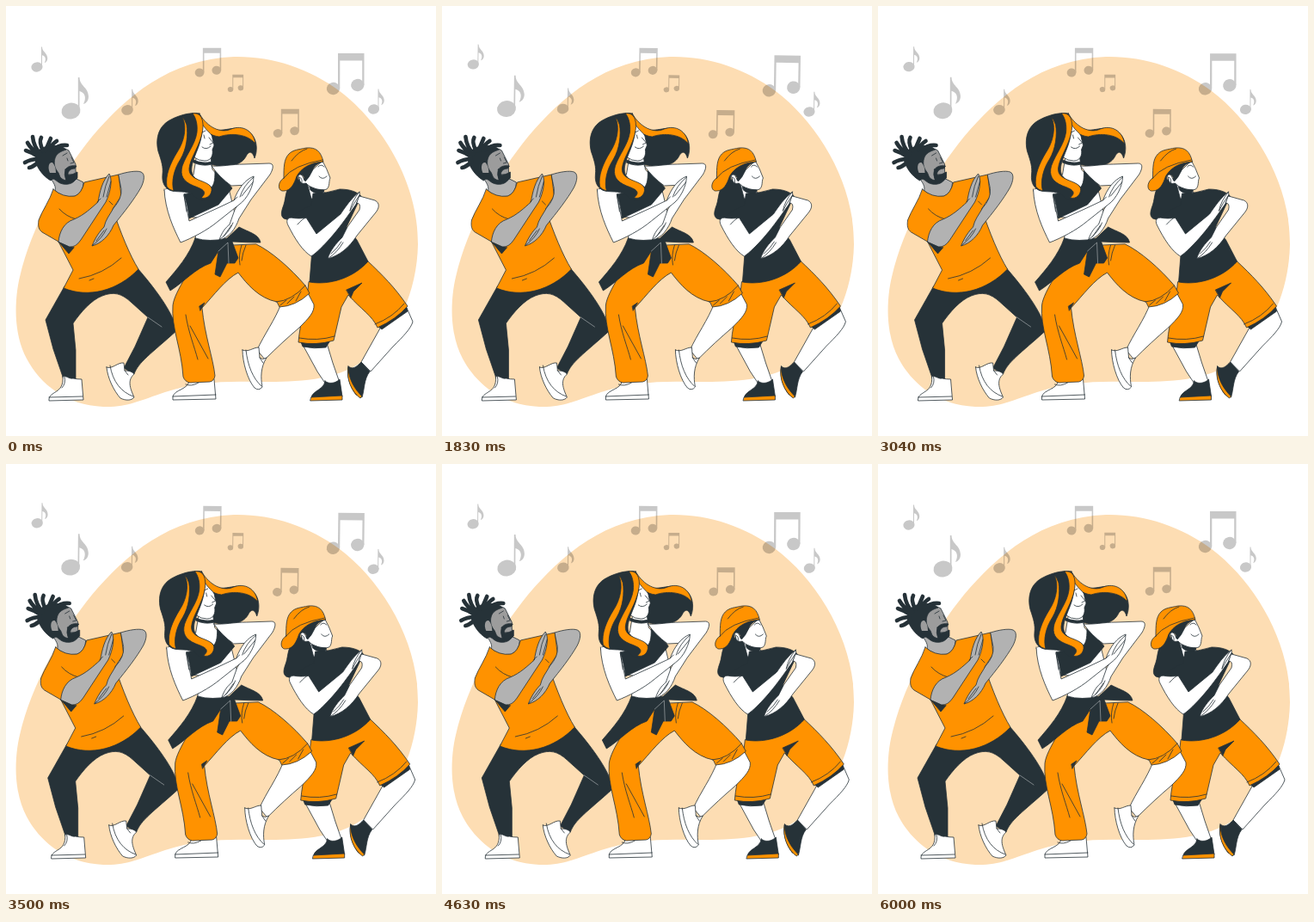
Recreate the animation shown at these times as an HTML page. Size 500 by 500 pixels, loop 6040 ms.

```html
<!DOCTYPE html>
<html lang="en">
<head>
<meta charset="utf-8">
<title>Dancers</title>
<style>
  html, body { margin: 0; width: 100%; height: 100%; overflow: hidden; background: #fff; }
  svg { display: block; width: 100vw; height: 100vh; }
  #dancers path { stroke: #263238; stroke-width: .8; stroke-linejoin: round; stroke-linecap: round; }
  .o { fill: #ff9200; }
  .d { fill: #263238; }
  .w { fill: #fff; }
  .s { fill: #b2b2b2; }
  .f { fill: #9c9c9c; }
  .l { fill: none; }
  #dancers .n { stroke: none; }
  #dancers .locks { fill: none; stroke-width: 4.6; }
  #dancers .crease { fill: none; stroke: #fff; stroke-width: .4; }
  #notes use { opacity: .21; }
</style>
</head>
<body>
<svg viewBox="0 0 500 500">
  <defs>
    <g id="single">
      <ellipse rx="11" ry="9.4" transform="rotate(-10)"/>
      <path d="M8.3-39H10C10-29 20-28 20.5-17C20.5-12 18-9 14.5-8C18-15 17-21 10-23V1H8.3Z"/>
    </g>
    <g id="pair">
      <ellipse rx="7.7" ry="7.2" transform="rotate(-12)"/>
      <ellipse cx="28.3" cy="-4" rx="7.7" ry="7.2" transform="rotate(-12 28.3 -4)"/>
      <path d="M5.5-41H36V-4H33.7V-32.5H7.8V0H5.5Z"/>
    </g>
  </defs>

  <path fill="#fdddb3" d="M265 59C308 58 352 72 388 99C437 136 480 206 479 277C478 332 455 385 415 413C380 438 330 437 290 437C250 436 220 438 185 449C155 459 140 467 113 466C70 464 40 440 24 410C8 380 10 340 16 315C30 255 65 195 100 152C140 105 190 62 265 59Z"/>

  <g id="notes">
    <use href="#single" transform="translate(36 71) scale(.6)"/>
    <use href="#single" transform="translate(75.5 122)"/>
    <use href="#single" transform="translate(141 121) scale(.62)"/>
    <use href="#single" transform="translate(427.5 120) scale(.6)"/>
    <use href="#pair" transform="translate(380.5 96)"/>
    <use href="#pair" transform="translate(225 77.5) scale(.7)"/>
    <use href="#pair" transform="translate(316 148) scale(.69)"/>
    <use href="#pair" transform="translate(261 97) scale(.42)"/>
  </g>

  <g id="dancers">
    <g id="capGirl">
      <path class="w" d="M344 392L362 425L372 440L388 438L380 415L373 392Z"/>
      <path class="w" d="M436 373L413 414L424 425L450 396C462 384 471 375 473 367L466 351Z"/>
      <path class="d" d="M371 436C375 440 383 439 388 434L391 454L355 455C357 447 370 446 371 436Z"/>
      <path class="o" d="M355 455L391 453V458L354 459Z"/>
      <path class="d" d="M398 419C404 424 409 418 413 414L423 425C416 434 417 446 414 455L407 452C400 443 396 430 398 419Z"/>
      <path class="o" d="M398 420C398 434 406 446 414 454L412 456C402 449 395 433 398 420Z"/>
      <path class="d" d="M342 388L345 396Q358 399 372 397L377 389ZM432 372L437 376L467 355L465 348Z"/>
      <path class="o" d="M352 321C350 346 342 365 340 391Q360 395 381 389L390 350L398 336C413 353 426 360 432 374Q454 364 467 349C452 327 438 313 420 296Z"/>
      <path class="l" d="M341 386Q362 390 382 384M429 370Q450 362 463 346"/>
      <path class="d" d="M396 330L414 322L404 332L401 339Z"/>
      <path class="d" d="M336 203C324 211 326 222 323 231C320 239 319 244 323 247C333 251 347 249 356 242L364 224L350 200Z"/>
      <path class="w" d="M350 205L355 224Q362 227 371 219L367 210Z"/>
      <path class="d" d="M331 246C340 239 345 236 355 232L357 218Q373 218 388 213C400 213 408 216 413 221L396 257L408 272L421 297C404 316 377 325 353 321L356 283Z"/>
      <path class="w" d="M341 201C337 192 344 193 347 203Q353 199 354 193L368 180L373 190L377 200C375 204 377 209 373 213C365 216 353 211 349 206Q342 208 341 201Z"/>
      <path class="d" d="M353 210Q361 214 370 214L368 218Q359 219 354 214Z"/>
      <path class="d" d="M335 201C341 189 354 182 369 181C362 183 358 186 356 192Q353 199 348 204C347 196 342 194 339 198L340 207Z"/>
      <path class="o" d="M323 200C323 188 323 178 329 172C334 167 340 167 349 165C361 164 366 169 369 181C353 182 343 189 338 198C335 207 331 215 323 215C316 216 315 205 323 200Z"/>
      <path class="l" d="M323 200Q334 185 368 179M332 180Q340 169 350 166M363 187Q366 183 370 187M364 198Q368 203 373 198M341 199Q345 200 344 205"/>
      <path class="w" d="M331 246C326 247 326 251 328 255C336 271 345 285 355 291C361 287 370 278 377 270C386 260 396 246 401 239C405 233 413 224 411 216C402 223 395 233 389 242L361 265L349 246Q341 248 331 246Z"/>
      <path class="w" d="M411 221L429 226C435 229 434 235 430 240L408 267C399 281 388 290 374 294C377 284 384 276 391 269L397 257L411 237Q413 229 408 229Z"/>
      <path class="l" d="M411 216Q402 227 400 238M411 220Q404 230 400 238M374 294Q385 287 392 275M378 288Q386 281 390 274M339 254Q345 247 349 246"/>
    </g>

    <g id="man">
      <path class="d" d="M68 326L46 365L55 399L67 434H81L81 400L78 369C87 356 99 342 112 337C125 332 134 334 145 344L165 362L150 396L137 421L149 428C154 414 168 405 199 377C193 354 172 327 153 305Z"/>
      <path class="crease" d="M165 362L181 373"/>
      <path class="w" d="M66 431C70 429 73 434 78 433Q83 434 88 434L90 458L50 459C49 447 68 452 66 431Z"/>
      <path class="l" d="M50 455L89 454M68 431Q70 439 65 444"/>
      <path class="w" d="M117 420C123 423 130 414 137 415L138 424Q146 424 149 428C141 435 144 444 149 455C146 459 139 459 133 456C125 447 118 432 117 420Z"/>
      <path class="l" d="M121 418C124 437 134 449 148 454M138 424L142 429"/>
      <path class="s" d="M53 202C57 208 58 211 57 215Q69 225 81 221Q90 216 90 205L80 200L62 194Z"/>
      <path class="o" d="M55 213C51 226 42 238 38 249C37 256 38 260 42 263L61 274L78 307L67 328C96 340 130 331 154 306C144 290 133 263 124 236L134 221L131 196L91 205Q88 218 80 221Q66 223 55 213Z"/>
      <path class="d" d="M61 274L73 288L79 281Z"/>
      <path class="l" d="M62 236Q70 245 82 248M85 317Q113 312 134 293M97 319L102 317M124 231L120 227"/>
      <path class="s" d="M131 196C140 193 152 191 157 193C162 195 161 203 157 211C149 225 138 239 125 255C120 267 111 276 100 279C104 269 109 262 114 257C116 248 120 244 125 235Q135 224 134 213Z"/>
      <path class="s" d="M61 274C62 263 67 252 79 248C91 243 99 235 107 228C109 216 112 203 120 195C124 201 122 216 116 228L108 240L87 272Q81 281 74 280Z"/>
      <path class="l" d="M120 198Q115 209 113 222M122 204L117 222M101 278Q112 270 117 259M105 273L114 261M106 228L110 224"/>
      <path class="f" d="M48 174C56 167 67 163 73 168L78 178L81 184L81 191L82 201C74 207 66 207 61 202L54 194Z"/>
      <path class="d" d="M36 170C42 162 55 161 66 164L70 167C64 169 59 171 57 177C55 184 57 189 61 194L63 199C68 205 76 203 82 199C80 207 70 209 63 206C57 203 56 199 52 203C43 198 36 188 34 180Z"/>
      <path class="locks" d="M40 172Q32 163 31 152M43 168Q38 158 41 153M46 168Q49 161 52 154M50 167Q54 160 59 157M54 167Q62 161 71 162M37 172Q29 166 25 159M37 175Q30 170 23 168M37 178Q29 178 22 182M38 181Q32 187 27 188"/>
      <path class="f n" d="M51 194C48 187 50 181 54 182Q58 186 58 194Z"/>
      <path class="d" d="M69 190C72 186 77 185 82 186L80 189C75 189 72 192 72 196Q77 197 83 193L83 200Q76 206 70 203Q67 196 69 190Z"/>
      <path class="l" d="M66 174L71 171M71 177L72 180M76 176L79 182L75 183"/>
    </g>

    <g id="longHair">
      <path class="d" d="M229 137C246 153 262 137 278 144C291 149 294 165 289 177C287 170 283 167 279 175C272 188 252 188 238 184Z"/>
      <path class="o" d="M226 127C234 140 249 149 262 143C275 138 288 145 290 160C281 149 262 147 248 152C238 151 230 145 226 136Z"/>
      <path class="w" d="M222 172L218 196L201 209C194 211 186 212 184 214L195 244L222 246L220 273H252L267 245L259 212L240 190L238 176Z"/>
      <path class="d" d="M207 219C210 228 212 237 213 247L247 231L263 212C258 204 249 200 246 190L243 187C243 201 243 207 238 212Z"/>
      <path class="w" d="M228 137C234 147 240 148 240 154L242 162L240 167C241 173 239 180 231 180Q224 180 219 176L219 149Z"/>
      <path class="d" d="M218 179Q229 184 240 181V184Q228 187 218 182Z"/>
      <path class="d" d="M225 125C213 123 199 128 190 133C176 141 174 156 177 169C181 181 183 187 182 196C181 206 185 212 192 215C204 217 213 214 220 222C228 229 238 226 240 217C243 206 226 207 219 199C212 191 218 179 223 166C228 154 231 136 225 125Z"/>
      <path class="o" d="M217 125C230 123 231 139 227 152C222 168 214 178 213 189C212 204 236 202 239 212C240 219 234 225 227 223C235 216 229 213 218 209C206 204 202 197 205 186C210 172 220 161 222 147C223 138 221 130 217 125Z"/>
      <path class="o" d="M205 129C211 141 207 158 199 170C191 183 185 197 187 210Q190 214 195 215C192 205 195 190 203 178C210 166 212 150 210 138Q208 132 205 129Z"/>
      <path class="l" d="M230 150L231 154M228 147L232 145M228 164Q233 168 238 163M236 153L241 159L237 161"/>
      <path class="w" d="M320 346C313 365 300 382 292 400L301 411C315 397 327 386 341 374C352 363 359 356 358 347L350 332Z"/>
      <path class="w" d="M275 400C282 403 287 397 294 397L295 409Q298 412 303 409C296 420 296 432 298 443Q294 448 289 444C281 435 275 414 275 400Z"/>
      <path class="l" d="M279 400C281 418 287 433 297 442M295 409L299 415"/>
      <path class="w" d="M213 436C212 446 196 446 194 454V458L244 457L242 434Z"/>
      <path class="l" d="M194 454L244 452M209 440Q215 443 224 438"/>
      <path class="o" d="M228 280C219 302 196 331 194 348C192 374 204 398 206 431Q208 437 214 438L237 437Q242 436 243 430C241 410 231 383 228 351C242 336 255 318 270 310C280 323 294 340 315 344L318 350Q337 349 353 334L348 325C331 305 308 285 291 277Z"/>
      <path class="l" d="M314 344Q332 343 348 325M319 348L326 342M327 346L335 338M337 343L343 332M209 359C212 379 219 396 223 411M214 372L235 410M274 278Q270 290 272 301M279 278Q275 287 274 296"/>
      <path class="d" d="M226 354L231 345L225 349Z"/>
      <path class="d" d="M220 270C213 290 199 306 186 321L191 331C207 321 220 305 238 299L247 285L243 312L249 315L257 299L266 299L270 293L263 274Q280 275 296 275C294 265 282 263 271 257L257 270Q237 275 220 270Z"/>
      <path class="crease" d="M247 285L258 275L259 299"/>
      <path class="w" d="M239 186C251 187 262 184 277 184L306 183C312 183 311 189 307 196L285 225L271 247C267 259 259 270 248 272C251 263 255 258 260 254L266 237L283 208L262 209Q248 199 239 186Z"/>
      <path class="w" d="M184 213C185 238 195 259 203 275C216 270 234 261 247 250L271 231C281 224 288 209 288 198C278 202 270 212 265 226L246 235L213 250L207 220"/>
      <path class="l" d="M288 199Q276 209 272 222M287 205L274 221M265 226L269 222M248 272Q260 263 264 252M253 268L262 255M207 220L210 239"/>
    </g>
  </g>
</svg>
<script>
  const LOOP = 6040, SHAKE = 6000, SWAY = 1500;
  const shakeX = [0, -1, 2, -4, 4, -4, 4, -4, 2, -1, 0];
  const notes = document.getElementById('notes');
  const dancers = document.getElementById('dancers');

  function shake(t) {
    const p = Math.min(t / SHAKE, 1) * 10;
    const i = Math.min(Math.floor(p), 9);
    return shakeX[i] + (shakeX[i + 1] - shakeX[i]) * (p - i);
  }

  // Linear swing 0 → 1 → -1 → 0 degrees.
  function sway(t) {
    const p = (t % SWAY) / SWAY;
    return p < .25 ? 4 * p : p < .75 ? 2 - 4 * p : 4 * p - 4;
  }

  function draw(t) {
    dancers.setAttribute('transform', `translate(${shake(t)} 0)`);
    notes.setAttribute('transform', `rotate(${sway(t)} 234.5 89.5)`);
  }

  const start = performance.now();
  function tick() {
    draw((performance.now() - start) % LOOP);
    requestAnimationFrame(tick);
  }
  draw(0);
  requestAnimationFrame(tick);
</script>
</body>
</html>
```
